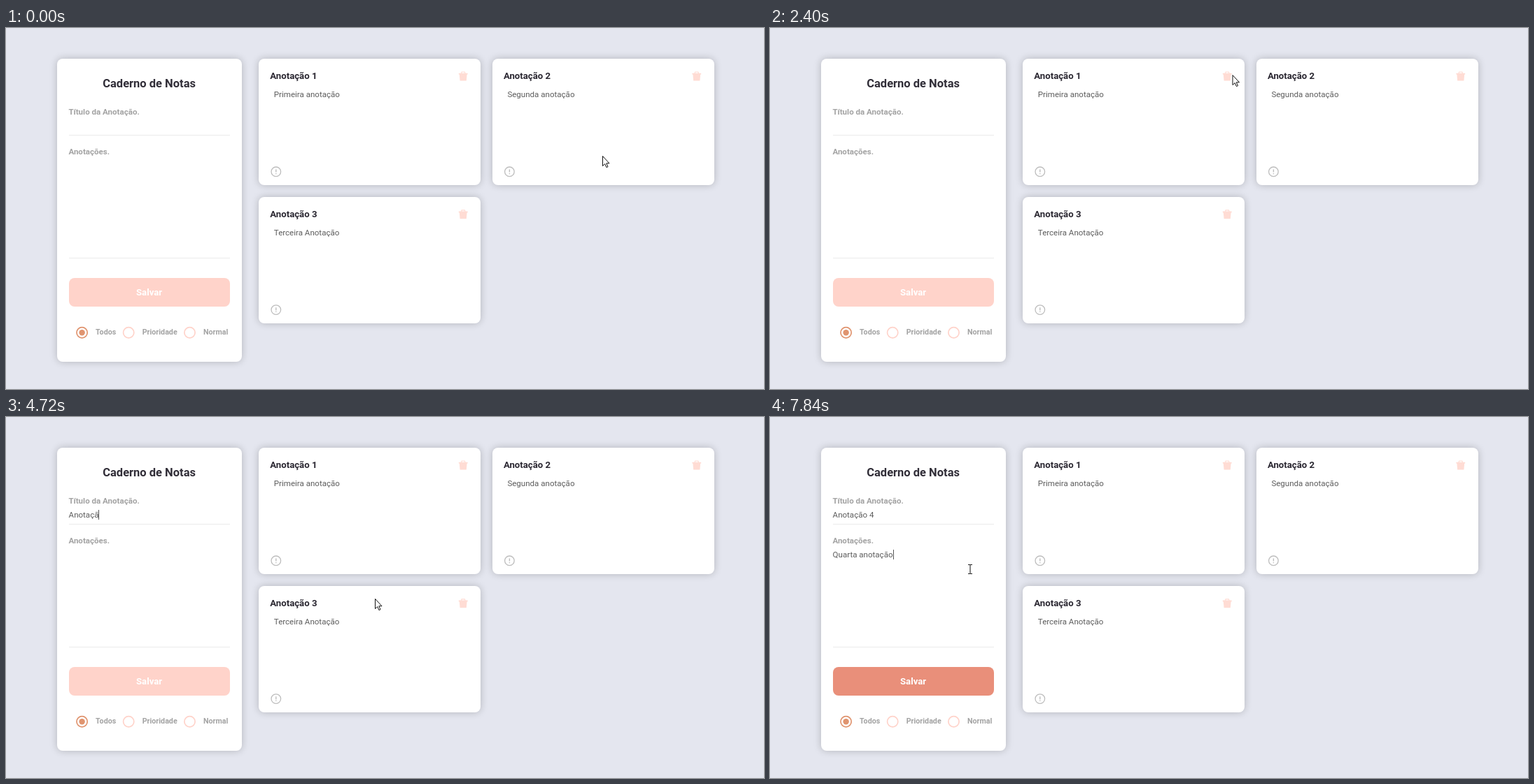
Animation of 1083x517 px, one loop 8000 ms. Source, as an HTML page:

```html
<!DOCTYPE html>
<html lang="pt">
<head>
<meta charset="utf-8">
<title>Caderno de Notas</title>
<style>
  html, body { margin: 0; width: 100%; height: 100%; overflow: hidden; background: #e4e6ef; }
  .box { position: absolute; background: #fff; border-radius: 8px; box-shadow: 0 0 11px rgba(0, 0, 0, .22); }
  svg { position: absolute; left: 0; top: 0; }
  text { font: 11.55px Roboto, sans-serif; fill: #5c5c5c; white-space: pre; }
  .head { font-size: 16.5px; font-weight: 600; fill: #312e38; text-anchor: middle; }
  .title { font-size: 13.2px; font-weight: 600; fill: #2a2731; }
  .label { font-weight: 700; fill: #a3a3a3; }
  .option { font-size: 10.7px; }
  .save { font-size: 13.2px; font-weight: 700; fill: #fff; text-anchor: middle; }
</style>
</head>
<body>
<svg id="stage" width="1083" height="517" viewBox="0 0 1083 517"></svg>
<script>
const LOOP = 8000;
const TEXT_X = 89.6;
const SALMON = [255, 211, 202];
const CORAL = [233, 143, 122];
const stage = document.getElementById('stage');
const rgb = c => `rgb(${c.map(Math.round)})`;
const clamp = k => Math.min(1, Math.max(0, k));
const mix = (a, b, k) => a + (b - a) * k;

function add(tag, attrs, parent = stage) {
  const el = document.createElementNS('http://www.w3.org/2000/svg', tag);
  for (const k in attrs) el.setAttribute(k, attrs[k]);
  return parent.appendChild(el);
}

function label(str, x, y, cls = '') {
  const el = add('text', { x, y: Math.round(y), class: cls });
  el.textContent = str;
  return el;
}

function box(x, y, w, h) {
  const el = document.createElement('div');
  el.className = 'box';
  el.style.cssText = `left:${x}px;top:${y}px;width:${w}px;height:${h}px`;
  document.body.insertBefore(el, stage);
}

// Icons that change colour under the pointer
const icons = [];
function icon(x, y, idle, hover) {
  const el = add('g', { transform: `translate(${x} ${y})` });
  icons.push({ el, x, y, idle, hover });
  return el;
}

function alertIcon(x, y) {
  const g = icon(x, y, '#bdbdbd', '#d0907a');
  add('circle', { r: 6.8, fill: 'none', stroke: 'currentColor', 'stroke-width': 1.3 }, g);
  add('path', { d: 'M0-3.4V.8M0 2.1V3.5', stroke: 'currentColor', 'stroke-width': 1.4 }, g);
}

function trashIcon(x, y) {
  const g = icon(x, y, '#ffdcd4', rgb(CORAL));
  add('path', {
    d: 'M-6.4-4.2H-3.4L-2.6-6.5H2.6L3.4-4.2H6.4V-2.4H5.4L4.6 6.4H-4.6L-5.4-2.4H-6.4ZM-2.1-4.2H2.1L1.7-5.4H-1.7Z',
    fill: 'currentColor', 'fill-rule': 'evenodd'
  }, g);
}

function card(x, y, title, body) {
  box(x, y, 317, 181);
  label(title, x + 16.3, y + 29.2, 'title');
  label(body, x + 21.8, y + 55.4);
  alertIcon(x + 24.8, y + 161.8);
  trashIcon(x + 292.2, y + 25);
}

function radio(x, on, name) {
  const color = on ? '#e0946f' : rgb(SALMON);
  add('circle', { cx: x, cy: 436.2, r: 7.6, fill: 'none', stroke: color, 'stroke-width': 1.7 });
  if (on) add('circle', { cx: x, cy: 436.2, r: 4.2, fill: color });
  label(name, x + 19.5, 439, 'label option');
}

box(73, 44, 264, 434);
label('Caderno de Notas', 204.6, 85, 'head');
label('Título da Anotação.', 89.4, 124, 'label');
label('Anotações.', 89.4, 181, 'label');
for (const y of [153, 329]) add('rect', { x: 90, y, width: 230, height: 1, fill: '#ebebeb' });
const button = add('rect', { x: 90, y: 358, width: 230, height: 41, rx: 8 });
label('Salvar', 204.6, 383, 'save');
radio(108.6, true, 'Todos');
radio(175.2, false, 'Prioridade');
radio(262.5, false, 'Normal');
card(361, 44, 'Anotação 1', 'Primeira anotação');
card(694.6, 44, 'Anotação 2', 'Segunda anotação');
card(361, 241.8, 'Anotação 3', 'Terceira Anotação');

// Letters appear between start and end; pace above 1 begins slowly
function field(str, y, times) {
  return {
    str, ...times,
    el: label('', TEXT_X, y),
    caret: add('rect', { y: y - 11, width: 1, height: 14, fill: '#555' })
  };
}
const fields = [
  field('Anotação 4', 144, { focus: 3400, start: 4200, end: 5020, blur: 5820, pace: 0.85 }),
  field('Quarta anotação', 201, { focus: 5820, start: 6320, end: 7820, blur: LOOP, pace: 1.3 })
];

const pointer = add('g', {});
const shapes = {
  arrow: add('path', {
    d: 'M.5.5V14.6L3.7 11.6 5.9 16.6 8 15.7 5.8 10.8H10Z',
    fill: '#fff', stroke: '#111', 'stroke-width': 1
  }, pointer),
  hand: add('path', {
    d: 'M-1.6 12V1.8Q-1.6.5-.2.5T1.2 1.8V6.8Q2.6 5.8 3.8 7.3 5.3 6.5 6.3 8 9 7.4 9 10V14Q9 16 7.5 17.3V19.7H-.2V18Q-2 16-4.6 12.2-5.4 10.5-4 10-2.8 9.8-1.6 12ZM1.2 6.8V10M3.8 7.3V10.3M6.3 8V10.6',
    fill: '#fff', stroke: '#111', 'stroke-width': 1, 'stroke-linejoin': 'round'
  }, pointer),
  beam: add('path', {
    d: 'M-3-6.5H-.8L0-6 .8-6.5H3M0-6V6M-3 6.5H-.8L0 6 .8 6.5H3',
    fill: 'none', stroke: '#222', 'stroke-width': 1.1
  }, pointer)
};

// Pointer moves: start, end, goal and, for a curved sweep, the point it bends towards
const home = [852, 183];
const moves = [
  [0, 1000, [724.5, 208], [294, 365]],
  [1100, 1400, [450, 208]],
  [1500, 1600, [388, 209]],
  [1700, 2000, [622, 75]],
  [2100, 2200, [653, 70]],
  [2300, 2400, [660.5, 67]],
  [2400, 2900, [24, 240], [340, 390]],
  [2900, 3200, [120.5, 147.5]],
  [3400, 3600, [527, 260]],
  [5420, 5920, [286, 218]]
];

function place(t) {
  let at = home;
  for (const [start, end, goal, bend] of moves) {
    if (t <= start) break;
    const k = clamp((t - start) / (end - start));
    const s = k * k * (3 - 2 * k);
    const from = at;
    at = goal.map((g, i) => {
      const via = bend ? bend[i] : (from[i] + g) / 2;
      return mix(mix(from[i], via, s), mix(via, g, s), s);
    });
  }
  return at;
}

// The screen refreshes every 100 ms and slips by 20 ms while the title is typed
function refreshTime(t) {
  const slip = t < 4600 ? 0 : 20;
  return Math.floor((t - slip) / 100) * 100 + slip;
}

const inField = (x, y) => x > 89 && x < 320 && ((y > 132 && y < 154) || (y > 188 && y < 330));

function drawField(f, t) {
  const k = clamp((t - f.start) / (f.end - f.start));
  const count = t < f.start ? 0 : 1 + Math.floor((f.str.length - 1) * k ** f.pace);
  f.el.textContent = f.str.slice(0, count);
  f.caret.setAttribute('x', Math.round(TEXT_X + (count && f.el.getComputedTextLength())));

  // The caret is steady during typing and blinks otherwise
  const idle = t < f.start ? t - f.focus : Math.max(0, t - f.end);
  const on = t >= f.focus && t < f.blur && idle % 1000 < 500;
  f.caret.setAttribute('visibility', on ? 'visible' : 'hidden');
}

function draw(time) {
  const t = refreshTime(time);
  const [x, y] = place(t);
  let kind = inField(x, y) ? 'beam' : 'arrow';
  for (const i of icons) {
    const over = Math.abs(x - i.x) < 6.9 && Math.abs(y - i.y) < 6.9;
    i.el.style.color = over ? i.hover : i.idle;
    if (over) kind = 'hand';
  }
  pointer.setAttribute('transform', `translate(${x} ${y})`);
  for (const k in shapes) shapes[k].style.display = k === kind ? '' : 'none';

  fields.forEach(f => drawField(f, t));
  const ready = clamp((t - 6220) / 200);
  button.setAttribute('fill', rgb(SALMON.map((c, i) => mix(c, CORAL[i], ready))));
}

const begin = performance.now();
function frame() {
  draw((performance.now() - begin) % LOOP);
  requestAnimationFrame(frame);
}
frame();
</script>
</body>
</html>
```
